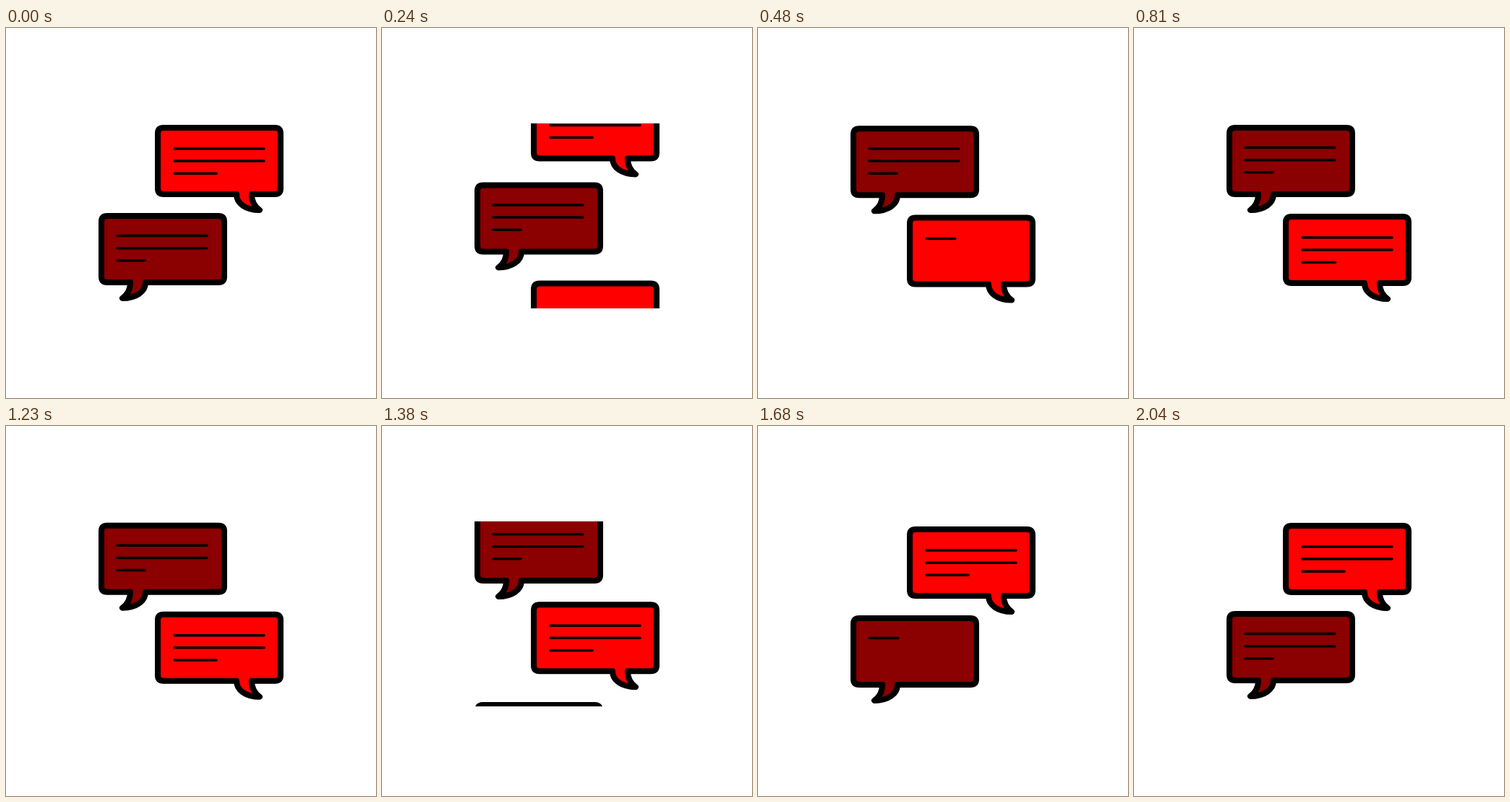
Write an HTML page with a canvas that moves like this. It is 512 px wide and 512 px high and loops after 2.43 s.

```html
<!DOCTYPE html>
<html lang="en">
<head>
<meta charset="utf-8">
<title>Chat bubbles</title>
<style>
  html, body { margin: 0; width: 100%; height: 100%; overflow: hidden; background: #fff; }
  canvas { display: block; width: 512px; height: 512px; }
</style>
</head>
<body>
<canvas id="stage" width="512" height="512"></canvas>
<script>
const LOOP = 2430, STEP = 30;
const TOP = 138, TRAVEL = 142;
const RED = { fill: '#ff0000', low: 261, x: 233, gap: 29, widths: [124, 124, 58] };
const DARK = { fill: '#8b0000', low: 260, x: 154, gap: 27.6, widths: [124, 124, 38], flip: true };

// start and length of each scroll, and when the new message begins to be written
const SCROLLS = [{ at: 0, span: 540 }, { at: 1200, span: 600 }];
const WRITE = [437, 1637], LINE_TIME = 134;

const ctx = document.getElementById('stage').getContext('2d');

// outline of the right-hand bubble, with y = 0 on its top edge
const bubble = new Path2D(
  'M218 0H372Q380 0 380 8V84Q380 92 372 92H340' +
  'C340 101 344 109 351 114C332 114 319 105 319 92' +
  'H218Q210 92 210 84V8Q210 0 218 0Z');

const clamp = v => Math.min(1, Math.max(0, v));

// cubic-bezier(.65, 0, .35, 1)
function ease(u) {
  let lo = 0, hi = 1;
  for (let i = 0; i < 24; i++) {
    const s = (lo + hi) / 2, r = 1 - s;
    const x = 1.95 * s * r * r + 1.05 * s * s * r + s * s * s;
    if (x < u) lo = s; else hi = s;
  }
  const s = (lo + hi) / 2;
  return s * s * (3 - 2 * s);
}

const scroll = (t, n) => ease(clamp((t - SCROLLS[n].at) / SCROLLS[n].span));

function drawBubble(kind, y, t, writeAt = -LOOP) {
  ctx.save();
  ctx.translate(0, y);

  ctx.save();
  if (kind.flip) ctx.transform(-1, 0, 0, 1, 512, 0);
  ctx.fillStyle = kind.fill;
  ctx.fill(bubble);
  ctx.lineWidth = 8;
  ctx.stroke(bubble);
  ctx.restore();

  ctx.lineWidth = 3.5;
  kind.widths.forEach((w, i) => {
    const part = clamp((t - writeAt) / LINE_TIME - i);
    if (!part) return;
    const ly = kind.gap + i * 17.1;
    ctx.beginPath();
    ctx.moveTo(kind.x, ly);
    ctx.lineTo(kind.x + w * part, ly);
    ctx.stroke();
  });
  ctx.restore();
}

function render(t) {
  const a = scroll(t, 0), b = scroll(t, 1);
  const rise = (kind, p) => kind.low + (TOP - kind.low) * p;

  ctx.fillStyle = '#fff';
  ctx.fillRect(0, 0, 512, 512);
  ctx.save();
  ctx.beginPath();
  ctx.rect(128, 132, 256, 256);
  ctx.clip();
  ctx.strokeStyle = '#000';
  ctx.lineCap = ctx.lineJoin = 'round';

  if (a < 1) drawBubble(RED, TOP - TRAVEL * a, t);
  if (b < 1) drawBubble(DARK, rise(DARK, a) - TRAVEL * b, t);
  if (a > 0) drawBubble(RED, rise(RED, b) + TRAVEL * (1 - a), t, WRITE[0]);
  if (b > 0) drawBubble(DARK, DARK.low + TRAVEL * (1 - b), t, WRITE[1]);
  ctx.restore();
}

const start = performance.now();
function tick() {
  const t = (performance.now() - start) % LOOP;
  render(Math.floor(t / STEP) * STEP);
  requestAnimationFrame(tick);
}
tick();
</script>
</body>
</html>
```
